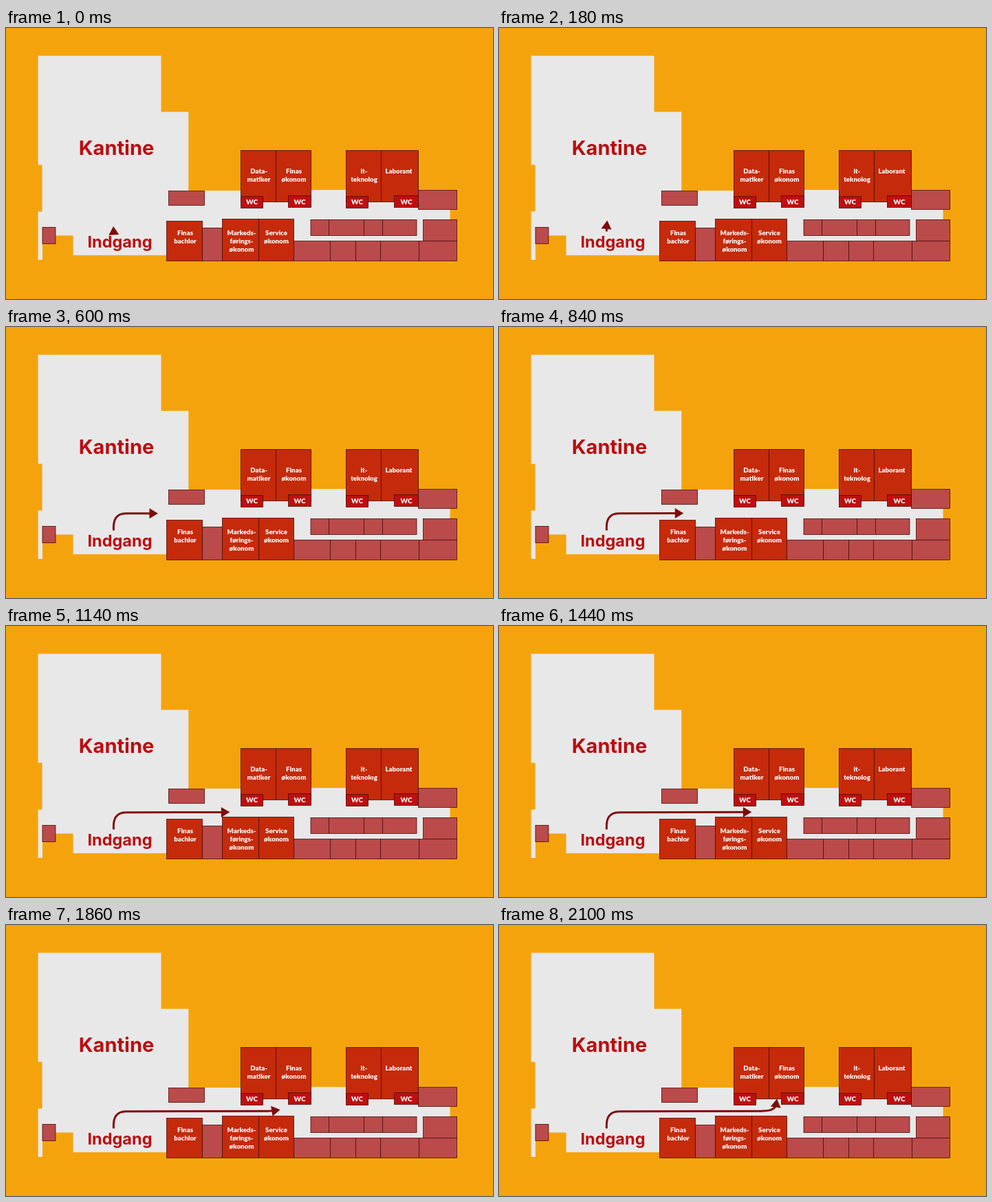
Recreate the animation shown at these times as an HTML page. Size 708 by 395 pixels, loop 2130 ms.

```html
<!DOCTYPE html>
<html lang="da">
<head>
<meta charset="utf-8">
<title>Vejviser</title>
<style>
  html, body { margin: 0; width: 100%; height: 100%; overflow: hidden; background: #f5a30c; }
  svg { display: block; width: 708px; height: 395px; }
  text { text-anchor: middle; }
  .floor { fill: #e8e8e8; }
  .side, .room, .wc { stroke: #4a0c08; stroke-width: .8; }
  .side { fill: #bb4a4a; }
  .room { fill: #c52a0b; }
  .wc { fill: #be0f0f; }
  .title { font-family: Inter, sans-serif; font-weight: 700; fill: #bc0d10; }
  .label { font: 900 9.7px Lato, sans-serif; fill: #fff; }
  .wcLabel { font: 900 10px Lato, sans-serif; fill: #fff; }
  #route { fill: none; stroke: #800b0d; stroke-width: 3; }
  #head { fill: #800b0d; }
</style>
</head>
<body>
<svg id="stage" viewBox="0 0 708 395">
  <rect width="708" height="395" fill="#f5a30c"/>
  <path class="floor" d="M46.600 40.500H225.500V122.300H265.300V237H443V236H645.600V311H315V331.300H97.600V302.500H53V338H46.600V267.500H52.600V199.500H46.600Z"/>
  <g id="map"></g>
  <text class="title" x="160.500" y="185" font-size="29">Kantine</text>
  <text class="title" x="165.500" y="320" font-size="23.500">Indgang</text>
  <path id="route" d="M156.500 296.500C155.500 281 160 272 174 271.800L380 271.200C392 271 402 270 403 260.500"/>
  <path id="head" d="M7.500 0L-5 -7.500V7.500Z"/>
</svg>
<script>
const LOOP = 2130, STEP = 30;
const map = document.getElementById('map');
const route = document.getElementById('route');
const head = document.getElementById('head');

function add(tag, attrs, content = '') {
  const node = document.createElementNS('http://www.w3.org/2000/svg', tag);
  for (const key in attrs) node.setAttribute(key, attrs[key]);
  node.textContent = content;
  map.appendChild(node);
}

function box(kind, left, top, right, bottom) {
  add('rect', { class: kind, x: left + .5, y: top + .5, width: right - left, height: bottom - top });
}

// A row of adjoining boxes between the given x edges.
function row(kind, top, bottom, ...edges) {
  for (let i = 1; i < edges.length; i++) box(kind, edges[i - 1], top, edges[i], bottom);
}

function label(x, y, ...lines) {
  lines.forEach((line, i) => add('text', { class: 'label', x, y: y + i * 12 }, line));
}

function wc(left, top, right) {
  box('wc', left, top, right, top + 17);
  add('text', { class: 'wcLabel', x: (left + right) / 2 + .5, y: 257 }, 'WC');
}

row('side', 237, 258, 236, 288);
row('side', 236, 264, 599, 655);
row('side', 290, 314, 52.5, 71.5);
row('side', 291, 339, 285, 314);
row('side', 279, 302, 442.5, 469, 520, 547, 596.5);
row('side', 279, 310, 606, 655);
row('side', 310, 339, 418, 471, 508, 544, 600, 655);
row('room', 178, 253, 341, 392, 443);
row('room', 178, 253, 494, 545, 599);
row('room', 281, 339, 233, 285);
row('room', 278, 339, 314, 367, 418);
wc(341, 245, 373);
wc(410, 244, 443);
wc(494, 245, 526);
wc(564, 244, 599);
label(367.5, 212, 'Data-', 'matiker');
label(418.5, 212, 'Finas', 'økonom');
label(520.5, 212, 'it-', 'teknolog');
label(571, 212, 'Laborant');
label(260.5, 302, 'Finas', 'bachlor');
label(342.5, 302, 'Markeds-', 'førings-', 'økonom');
label(393, 302, 'Service', 'økonom');

// Time in ms, distance along the route, speed in px per ms.
const keys = [
  [0, 0, .01], [360, 31, .165], [840, 122, .195], [1140, 179, .17],
  [1440, 221, .1], [1650, 237, .07], [2100, 269, .06]
];

function distanceAt(time) {
  const t = Math.min(time, 2100);
  const i = Math.max(1, keys.findIndex(key => key[0] >= t));
  const [t0, d0, v0] = keys[i - 1], [t1, d1, v1] = keys[i];
  const span = t1 - t0, u = (t - t0) / span, w = 1 - u;
  return w * w * (1 + 2 * u) * d0 + u * u * (3 - 2 * u) * d1
    + span * u * w * (w * v0 - u * v1);
}

const total = route.getTotalLength();

function draw(time) {
  const d = Math.min(distanceAt(time), total);
  const tip = route.getPointAtLength(d);
  const a = route.getPointAtLength(Math.max(0, d - 1));
  const b = route.getPointAtLength(Math.min(total, d + 1));
  const angle = Math.atan2(b.y - a.y, b.x - a.x) * 180 / Math.PI;
  route.setAttribute('stroke-dasharray', `${d} ${total + 10}`);
  head.setAttribute('transform', `translate(${tip.x} ${tip.y}) rotate(${angle})`);
}

const start = performance.now();
function tick() {
  const time = (performance.now() - start) % LOOP;
  draw(Math.floor(time / STEP) * STEP);
  requestAnimationFrame(tick);
}
tick();
</script>
</body>
</html>
```
